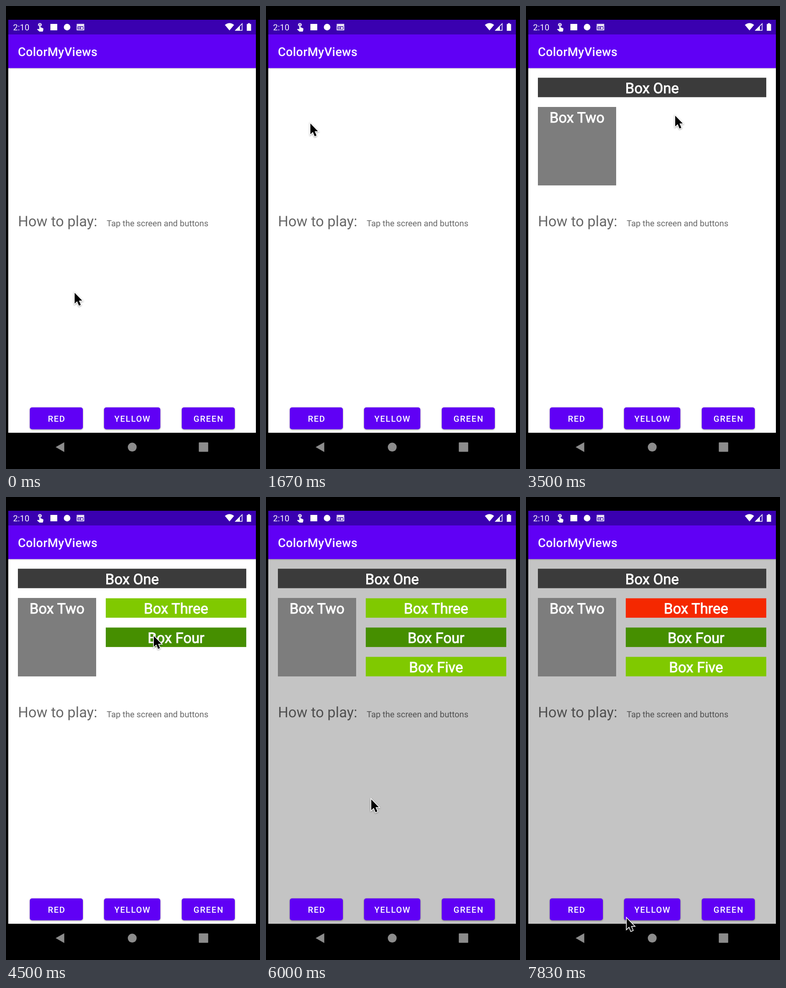
Recreate the animation shown at these times as an HTML page. Size 555 px wide and 1009 px high, loop 8 s.

```html
<!DOCTYPE html>
<html lang="en">
<head>
<meta charset="utf-8">
<title>ColorMyViews</title>
<style>
  html, body { margin: 0; width: 100%; height: 100%; overflow: hidden; background: #000; }
  svg { display: block; width: 555px; height: 1009px; }
  text { font-family: Roboto, sans-serif; fill: #fff; text-rendering: geometricPrecision; }
  .mid { text-anchor: middle; }
  .box text { font-size: 31.6px; stroke: #fff; stroke-width: .9px; }
  .button text { font-size: 18.4px; font-weight: 500; letter-spacing: .0893em; }
  .button > rect { fill: #6000f5; filter: drop-shadow(0 1.5px 1.5px rgba(0, 0, 0, .4)); }
  .hint text { fill: rgba(0, 0, 0, .6); }
  #toolbar { filter: drop-shadow(0 1px 1px rgba(0, 0, 0, .25)); }
  #cursor { filter: drop-shadow(0 1.5px 1.5px rgba(0, 0, 0, .4)); }
</style>
</head>
<body>
<svg viewBox="0 0 555 1009">
  <rect width="555" height="1009"/>
  <rect id="page" x="5" y="62" width="541" height="868"/>
  <rect id="toolbar" x="5" y="61" width="541" height="74.3" fill="#6000f5"/>
  <rect x="5" y="30" width="541" height="32" fill="#3a00b0"/>
  <text x="26" y="108.5" font-size="26.3" font-weight="500" letter-spacing=".33">ColorMyViews</text>

  <g id="status" fill="#fff">
    <text x="15.5" y="52.5" font-size="18.4">2:10</text>
    <path transform="translate(63.5 34.6) scale(.92 .88)" d="M9 11.2V7.5a2.5 2.5 0 0 1 5 0v3.7a4.5 4.5 0 1 0-5 0zm9.8 4.7-4.5-2.3-1.3-.1v-6a1.5 1.5 0 0 0-3 0v10.7l-3.4-.7q-.6-.1-1 .3l-.8.8 4.9 4.9q.5.5 1.1.5h6.8q1.2-.1 1.4-1.3l.8-5.3q0-1.1-1-1.5z"/>
    <rect x="97" y="39" width="15" height="14"/>
    <circle cx="133.5" cy="46" r="7.2"/>
    <path fill-rule="evenodd" d="M154.5 39h16.5v14h-16.5zM156.2 44.3v7h13.1v-7z"/>
    <path d="M157.5 46h4.5v1.4h-4.5zM157.5 48.7h4.5v1.4h-4.5zM163.5 46h4.5v4.1h-4.5z"/>
    <path d="M155 41.4h16" stroke="#3a00b0" stroke-dasharray="1.5 2"/>
    <path d="M488.3 53.2 478.3 41.3q10-8 20 0z"/>
    <path d="M501.5 53 516 38.5V53z" fill="none" stroke="#fff" stroke-width="1.4"/>
    <path d="M500.5 53.5 511 43v10.5z"/>
    <path d="M528.7 37.5h4.2v1.8h2.6V54h-9.4V39.3h2.6z"/>
  </g>

  <g class="hint">
    <text x="26.3" y="479.8" font-size="31.6">How to play:</text>
    <text x="220" y="479.8" font-size="18.4">Tap the screen and buttons</text>
  </g>

  <g id="boxes"></g>
  <g id="buttons"></g>

  <g fill="#8c8c8c">
    <path d="M108.5 961.3 127.3 950.7V972z"/>
    <circle cx="275.8" cy="961.3" r="9.7"/>
    <rect x="421.3" y="951" width="20.5" height="20.5" rx="1"/>
  </g>

  <path id="cursor" d="M0 0V23.5L5.4 18.6 9.4 28 13.4 26.2 9.4 17H16.5Z"
        stroke="#fff" stroke-width="3" paint-order="stroke"/>
</svg>
<script>
const LOOP = 8000, STEP = 500 / 3;
const byId = id => document.getElementById(id);

function add(parent, tag, attrs, text = '') {
  const el = document.createElementNS('http://www.w3.org/2000/svg', tag);
  for (const key in attrs) el.setAttribute(key, attrs[key]);
  el.textContent = text;
  return parent.appendChild(el);
}

function label(parent, x, y, text) {
  add(parent, 'text', { x, y, class: 'mid' }, text);
}

// name, x, y, width, height, colour, time it is tapped
const boxes = [
  ['One', 26, 156.3, 499, 42.4, '#3b3b3b', 3000],
  ['Two', 26, 220, 171, 171, '#7d7d7d', 2000],
  ['Three', 218, 220.7, 307, 42.4, '#80c900', 3833],
  ['Four', 218, 284.5, 307, 42.4, '#468f00', 4500],
  ['Five', 218, 348.4, 307, 42.4, '#80c900', 5000]
].map(([name, x, y, width, height, fill, shownAt]) => {
  const group = add(byId('boxes'), 'g', { class: 'box' });
  const rect = add(group, 'rect', { x, y, width, height, fill });
  label(group, x + width / 2, y + 33.5, 'Box ' + name);
  return { group, rect, fill, shownAt };
});

const buttons = [['RED', 52, 116], ['YELLOW', 214.2, 123], ['GREEN', 384, 116]].map(([name, x, width]) => {
  const group = add(byId('buttons'), 'g', { class: 'button' });
  const shape = { x, y: 874.7, width, height: 47.8, rx: 5 };
  add(group, 'rect', shape);
  const ripple = add(group, 'rect', { ...shape, style: 'fill:#fff;filter:none', opacity: 0 });
  label(group, x + width / 2 + .8, 906.3, name);
  return ripple;
});

// pointer moves: start, end, target x, target y
const start = [150, 625];
const moves = [
  [0, 1333, 97, 256],
  [2167, 2667, 334, 177],
  [3167, 3500, 326, 239],
  [4000, 4333, 323, 303],
  [4500, 4833, 320, 366],
  [5167, 5667, 230, 659],
  [6167, 7000, 108, 890],
  [7333, 7833, 220, 918]
];

function pointerAt(t) {
  let [x, y] = start;
  for (const [from, to, tx, ty] of moves) {
    const p = Math.min(1, Math.max(0, (t - from) / (to - from)));
    const ease = p * p * (3 - 2 * p);
    x += (tx - x) * ease;
    y += (ty - y) * ease;
  }
  return [x, y];
}

const backgroundAt = 6000, redAt = 7333;

function draw(now) {
  // the screen refreshes six times a second
  const step = Math.floor((now % LOOP + 4) / STEP) % 48;
  const t = step * STEP + 1;
  byId('page').setAttribute('fill', t >= backgroundAt ? '#c4c4c4' : '#fff');
  for (const { group, shownAt } of boxes) group.style.display = t >= shownAt ? '' : 'none';
  boxes[2].rect.setAttribute('fill', t >= redAt ? '#f52800' : boxes[2].fill);
  const fade = t >= redAt ? Math.max(0, 1 - (t - redAt) / 400) : 0;
  buttons[0].setAttribute('opacity', .22 * fade);
  byId('cursor').setAttribute('transform', `translate(${pointerAt(t)})`);
}

function tick() {
  draw(performance.now());
  requestAnimationFrame(tick);
}
tick();
</script>
</body>
</html>
```
